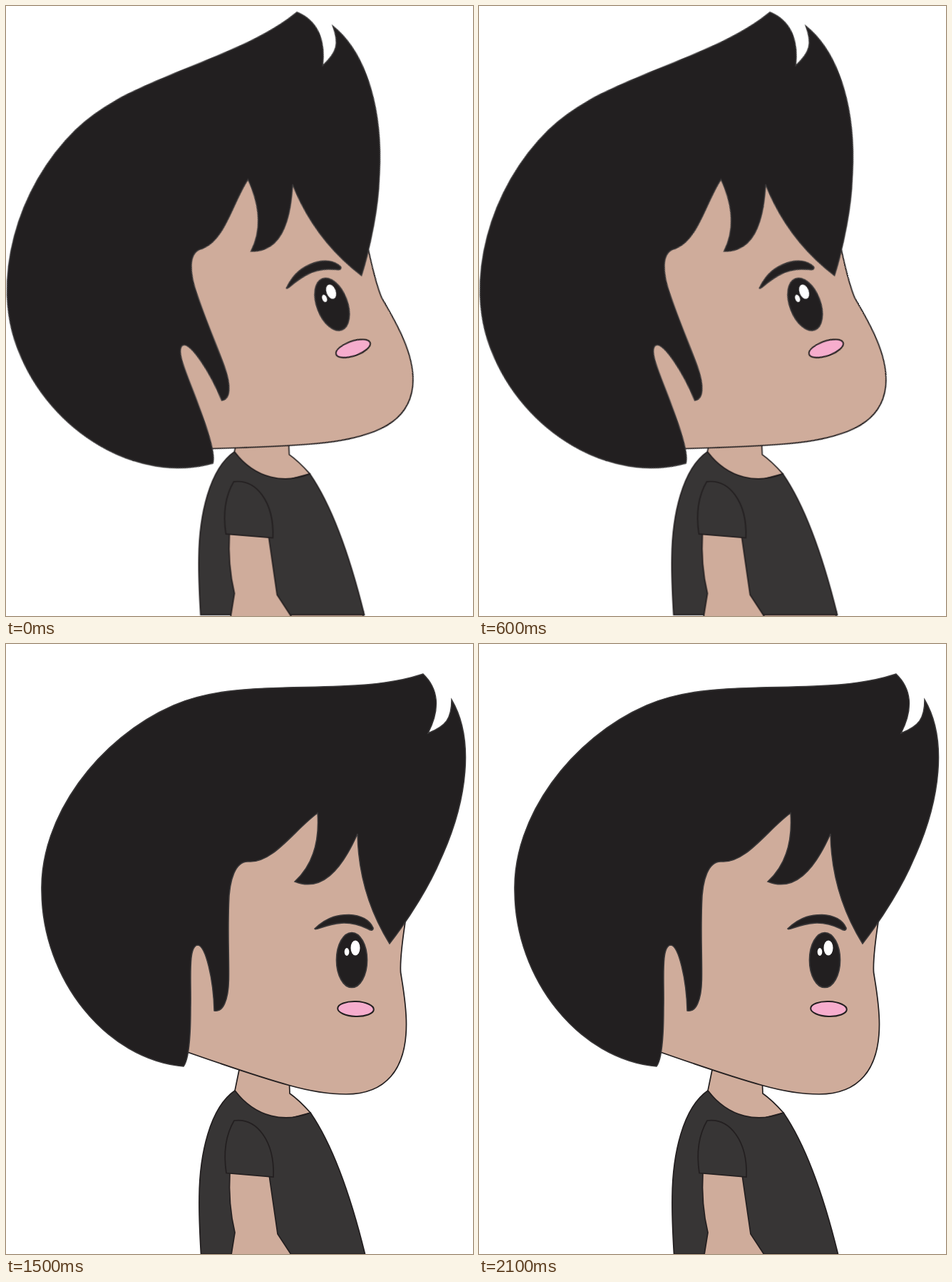
An HTML page without scripts for the animation above (2400 ms loop, 655x855 px).

```html
<!DOCTYPE html>
<html lang="en">
<head>
<meta charset="utf-8">
<title>Nodding boy</title>
<style>
  html, body { margin: 0; width: 100%; height: 100%; overflow: hidden; background: #fff; }
  svg { display: block; width: 655px; height: 855px; }
  path, ellipse { stroke: #231f20; stroke-width: 1.7; }
  .skin { fill: #cfac9b; }
  .shirt { fill: #373535; }
  .hair { fill: #221f20; stroke: #3a3839; stroke-width: 1.5; }
  .eye { fill: #221f20; stroke: #3a3839; }
  .shine { fill: #fff; stroke: none; }
  .blush { fill: #f6adcd; stroke-width: 2; }

  .head { animation: nod 600ms step-end infinite; }
  .body { animation: settle 600ms step-end infinite; }

  /* head tilts back about the nape, then drops forward */
  @keyframes nod {
    0% { transform: translate(290.2px, 640.9px) rotate(-20.85deg) scale(.998) translate(-249px, -592px); }
    50%, 100% { transform: none; }
  }
  @keyframes settle {
    0% { transform: scale(.998); }
    50%, 100% { transform: none; }
  }
</style>
</head>
<body>
<svg viewBox="0 0 655 855" xmlns="http://www.w3.org/2000/svg">
  <g class="body">
    <path class="skin" d="M328 592 L321 626 L360 675 L427 657 C418 647 408 637 398 630 L397 605Z"/>
    <path class="skin" d="M390 850 H502 V870 H390Z"/>
    <path class="shirt" d="M321 626 C286 650 271.500 715 271 775 C270.500 805 272 830 273.500 855 H503.500 C485 780 460 705 427 657 C392 671 351 665 321 626Z"/>
    <path class="skin" d="M314 740 C312 775 315 800 321 825 L315 862 H404 L381 827 L369 744Z"/>
    <path class="shirt" d="M309 741.500 C305 715 307 690 320 668 C352 664 377 697 375 747Z"/>
  </g>

  <g class="head">
    <path class="skin" d="M250 570.500 C300 588 350 605.500 397 618.500 C420 625 450 631 477 631 C532 631 561.500 597 561.500 533 C561.500 505 557 482 553.500 460 C552.500 440 556 415 560.500 386 L480 220 L300 280 L240 430Z"/>
    <path class="hair" d="M585 42 C606 62 610 90 592 125 C617 115 625 105 625 78
      C657 132 648 218 610 301 C595 337 567 383 538 420
      C510 375 494 325 493 266 C470 318 442 348 405 333
      C428 312 440 280 437 237 C405 260 375 307 341 305
      C322 303 313 330 312.500 365 C311 410 313 440 312.500 470
      C312 500 304 517 292 514 C291 470 280 423 269 422
      C255 423 260 470 259 510 C259 545 257 582 249 592
      C140 582 51 470 50 347 C47 243 129 132 235 86
      C335 42 480 77 585 42Z"/>
    <path class="eye" d="M433 399 C452 381 468 379.500 481 379.500 C498 380 510 387 515 398 C515 402 512 402 507 399 C480 386 460 391 439 398.500 C436 399.500 433 400 433 399Z"/>
    <ellipse class="eye" cx="485" cy="443" rx="21.500" ry="38.500"/>
    <ellipse class="shine" cx="490" cy="426" rx="6.500" ry="10.500"/>
    <ellipse class="shine" cx="478" cy="431.500" rx="3.300" ry="5.400"/>
    <ellipse class="blush" cx="490.500" cy="511.500" rx="25.300" ry="10.400" transform="rotate(2 490.500 511.500)"/>
  </g>
</svg>
</body>
</html>
```
